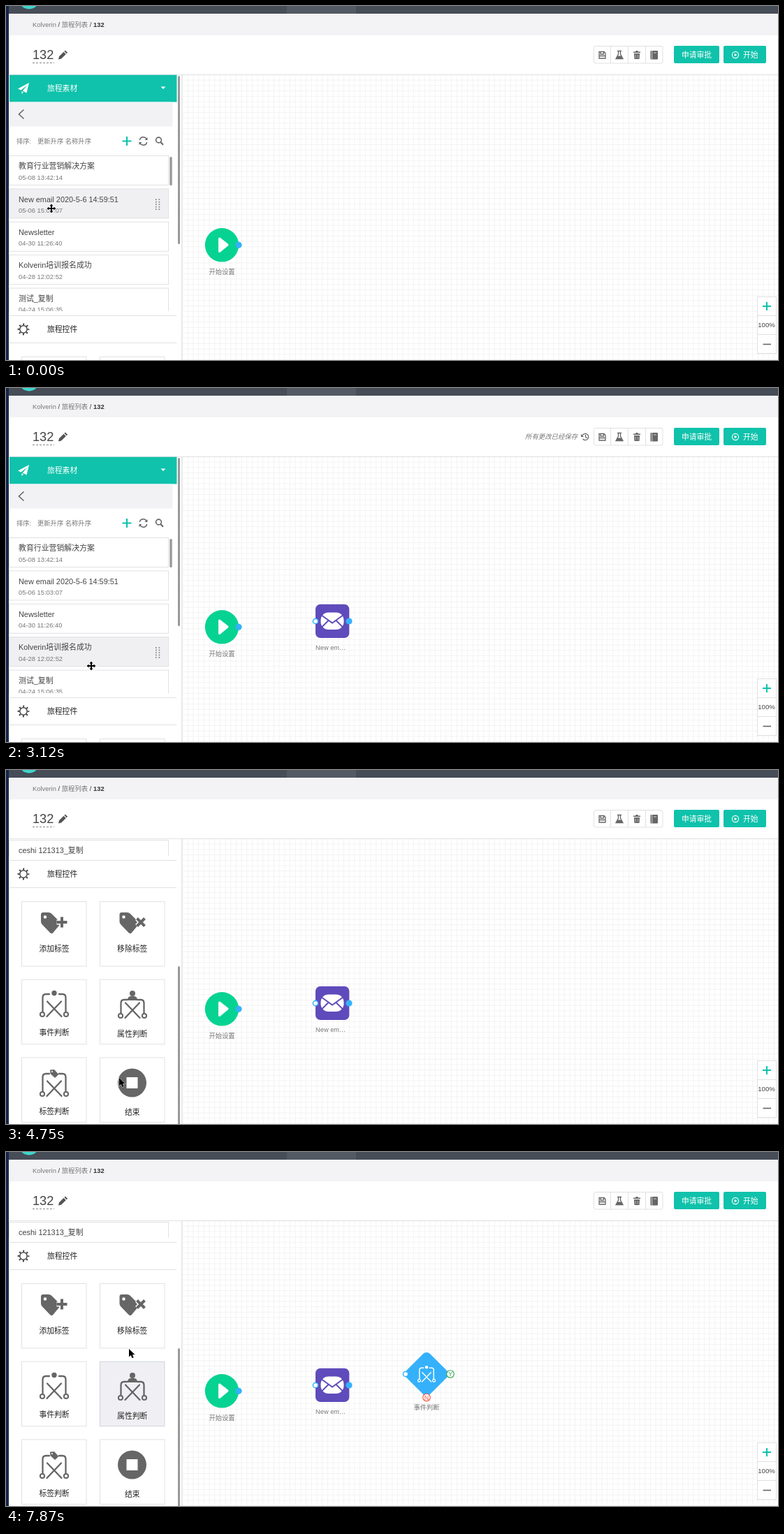
An HTML page that plays this animation: 1105 px wide and 507 px high, repeating every 8 s.

```html
<!DOCTYPE html>
<html lang="zh-CN">
<head>
<meta charset="utf-8">
<title>Journey editor</title>
<style>
  html, body { margin: 0; width: 100%; height: 100%; overflow: hidden; background: #fff; }
  svg { display: block; width: 1105px; height: 507px; }
  text { font-family: "Liberation Sans", "Noto Sans CJK SC", "Noto Sans CJK", sans-serif; white-space: pre; }
</style>
</head>
<body>
<svg id="stage" viewBox="0 0 1105 507" xmlns="http://www.w3.org/2000/svg"></svg>
<script>
const LOOP = 8000, STEP = 148.6, PITCH = 47.4;
const TEAL = '#10c2ab', BLUE = '#35b1fb', INK = '#444', GREY = '#666', LINE = '#e1e1e4', HOVER = '#f0f0f2';

const rect = (x, y, w, h, fill, more = '') =>
  `<rect x="${x}" y="${y}" width="${w}" height="${h}" fill="${fill}" ${more}/>`;
const circle = (x, y, r, fill, more = '') => `<circle cx="${x}" cy="${y}" r="${r}" fill="${fill}" ${more}/>`;
const stroke = (d, color, width = 1, more = '') =>
  `<path d="${d}" fill="none" stroke="${color}" stroke-width="${width}" ${more}/>`;
const shape = (d, fill, more = '') => `<path d="${d}" fill="${fill}" ${more}/>`;
const text = (x, y, s, size, fill, more = '') =>
  `<text x="${x}" y="${y}" font-size="${size}" fill="${fill}" ${more}>${s}</text>`;
const mid = (x, y, s, size, fill) => text(x, y, s, size, fill, 'text-anchor="middle"');
const at = (x, y, inner, more = '') => `<g transform="translate(${x} ${y})" ${more}>${inner}</g>`;

// Branch icon, centred on 0,0; y is the height of its shoulders
const arm = (side, y) =>
  `M${side * 7} ${y}H${side * 12}Q${side * 16.5} ${y} ${side * 16.5} ${y + 5}V10.500M${side * 10} -4.500L${side * -10.5} 17`;
const branch = (color, top, y = -15) =>
  stroke(arm(-1, y) + arm(1, y), color, 2.3, 'stroke-linecap="round"') +
  [-17, 17].map(x => circle(x, 14, 3.1, 'none', `stroke="${color}" stroke-width="2"`)).join('') + top;
const eventIcon = color => branch(color, circle(0, -16.5, 3.7, color));

const items = [
  ['教育行业营销解决方案', '05-08 13:42:14'],
  ['New email 2020-5-6 14:59:51', '05-06 15:03:07'],
  ['Newsletter', '04-30 11:26:40'],
  ['Kolverin培训报名成功', '04-28 12:02:52'],
  ['测试_复制', '04-24 15:06:35'],
  ['会议邀请_第二轮', '04-22 10:18:26'],
  ['报名成功通知', '04-17 17:40:12'],
  ['活动提醒邮件', '04-14 09:55:03'],
  ['直播回放 | 内容营销实战', '04-09 16:21:38'],
  ['客户关怀_访问触发', '04-07 14:08:51'],
  ['问卷调查邀请', '04-02 11:33:20'],
  ['直播占座 | 开源+截流，让每一分营销预…', '03-30 15:32:22'],
  ['破碎筛分_访问触发', '03-27 10:52:28'],
  ['【干货】不用996，也能当劳模！', '03-26 14:31:31'],
  ['自动化营销如何赋能品牌建设带动营销新…', '03-23 15:16:59'],
  ['报名倒计时 | 开源+截流，让每一分营销…', '03-20 16:49:47'],
  ['ceshi 121313_复制', '03-18 13:20:45']
];

function dots(x) {
  let s = '';
  for (let i = 0; i < 10; i++) s += rect(x + i % 2 * 4.6, 14 + (i >> 1) * 3.5, 1.6, 1.6, '#777');
  return s;
}
function card([title, date], i) {
  const wide = title.endsWith('…');
  return at(0, 215 + i * PITCH,
    rect(4.5, -.5, 228, 42, '#fff', `class="bg" stroke="${LINE}"`) +
    text(18, 18.3, title, 10.9, INK) + text(18, 33.5, date, 9.4, '#777') +
    `<g class="dots" clip-path="url(#cardClip)">${dots(wide ? 230 : 214)}</g>`, 'class="item"');
}

const tag = 'M50 207Q50 204 53 204H61Q63.500 204 65 205.500L77 217.500Q78.500 219.500 77 221.500L67 233.500Q65 235 63 233L51.500 221Q50 219.500 50 217Z';
const tagIcon = mark => shape(tag, GREY) + circle(56, 210.5, 2.2, '#fff') +
  stroke(mark, '#fff', 7) + stroke(mark, GREY, 4);
const person = circle(0, -18, 4, GREY) + shape('M-7 -8Q-7 -14 -2.500 -14H2.500Q7 -14 7 -8Z', GREY);
const miniTag = shape('M-6 -20.500L0 -21L6.500 -14L1 -9L-5.500 -15Z', GREY) + circle(-3, -18, 1.1, '#fff');
const tool = (col, row, label, base, icon) =>
  rect(22.5 + col * 112, 188.5 + row * 111.7, 92.5, 92.5, '#fff', `class="tool" stroke="${LINE}"`) +
  icon + mid(69 + col * 111.7, base, label, 10.8, '#222');

const toolbox = at(0, 314,
  stroke('M5 129.500H244M5 168.500H244', LINE) +
  circle(25, 149, 5.2, 'none', 'stroke="#444" stroke-width="1.5"') +
  circle(25, 149, 7.1, 'none', 'stroke="#444" stroke-width="2.6" stroke-dasharray="2 3.576" stroke-dashoffset="1"') +
  text(59, 153, '旅程控件', 10.8, '#222') +
  tool(0, 0, '添加标签', 260, tagIcon('M80 210.500V225.500M72.500 218H87.500')) +
  tool(1, 0, '移除标签', 260, at(112.5, 0, tagIcon('M75 212.500L86 223.500M86 212.500L75 223.500'))) +
  tool(0, 1, '事件判断', 380, at(69, 336, eventIcon(GREY))) +
  tool(1, 1, '属性判断', 382, at(181, 338, branch(GREY, person, -9))) +
  tool(0, 2, '标签判断', 493, at(69, 450, branch(GREY, miniTag))) +
  tool(1, 2, '结束', 494, circle(180.5, 448, 20.5, GREY) + rect(172.5, 440, 16, 16, '#fff')));

const sidebar =
  rect(5, 98, 239.500, 39.500, TEAL) +
  shape('M33 110L17 118.500L21.500 120.500L30.500 113.500L23.800 121.500L29.500 124.500ZM22.500 122V126L25 123.500Z', '#fff') +
  text(59, 122, '旅程素材', 10.8, '#fff') + shape('M221.500 115.500H228.500L225 119Z', '#fff') +
  rect(5, 137.5, 233.5, 35, '#f2f2f4') + stroke('M25.500 148.500L18.500 155L25.500 161.500', GREY, 1.6) +
  text(15, 196.500, '排序:', 9.3, '#777') + text(45, 196.500, '更新升序 名称升序', 9.3, '#777') +
  stroke('M173 187V200M166.500 193.500H179.500', TEAL, 2.2) +
  stroke('M191.300 192A5.200 5.200 0 0 1 201 190.500M201.700 195A5.200 5.200 0 0 1 192 196.500', GREY, 1.4) +
  shape('M202.500 188V192H198.500ZM190.500 199V195H194.500Z', GREY) +
  circle(218.5, 192, 3.9, 'none', `stroke="${GREY}" stroke-width="1.6"`) + stroke('M221.300 195L225 198.800', GREY, 2) +
  `<g clip-path="url(#listClip)"><g id="list">${items.map(card).join('')}</g></g>` +
  rect(234.3, 216, 3.4, 41, '#999', 'id="thumb" rx="1.5"') + toolbox;

const header =
  rect(0, 0, 1105, 11, '#464d57') + rect(402, 0, 99, 11, '#535a63') + circle(33, -10.5, 15, '#3fd6cc') +
  rect(0, 11, 1105, 31, '#f3f3f5') + rect(0, 42, 1105, 56, '#fff') +
  text(38, 29.500, `Kolverin <tspan fill="#333">/</tspan> 旅程列表 <tspan fill="#333">/ <tspan font-weight="bold">132</tspan></tspan>`, 9.4, '#777') +
  text(38, 76, '132', 18.2, INK) + stroke('M38 81.500H69', '#888', 1, 'stroke-dasharray="3 2"') +
  shape('M75 76.500L76 72.300L82.500 65.800L85.800 69L79.200 75.500ZM83.400 64.900L84.800 63.600L88.200 66.800L86.700 68.200Z', '#555') +
  `<g id="saved">${text(743, 73, '所有更改已经保存', 9.4, '#777', 'font-style="italic"')}` +
  stroke('M825 68A4.600 4.600 0 1 1 825.500 72.800M829.500 67V70.300L832 71.500', GREY, 1.2) + shape('M823 66V70H827Z', GREY) + '</g>' +
  rect(841.5, 57.5, 98.5, 24.5, '#fff', `stroke="${LINE}" rx="2"`) + stroke('M865.500 58V82M890.500 58V82M915.500 58V82', LINE) +
  stroke('M849 65.500H856L858 67.500V75H849ZM851 65.500V69H855.500V65.500M849 71.500H858', GREY, 1.3) +
  stroke('M875 64.500H881M876.500 65V69L873 75.500H883L879.500 69V65', GREY, 1.3) + shape('M875.500 71.500H880.500L882.500 75H873.500Z', GREY) +
  shape('M898 65.500H901L902 64H904L905 65.500H908V67H898ZM899 68H907L906.500 76H899.500Z', GREY) +
  stroke('M901.500 69.500V74.500M904.500 69.500V74.500', '#ccc', .8) +
  rect(922.5, 64, 10.500, 12.500, GREY, 'rx="1"') + stroke('M924.700 64V76.500M927 67H931', '#ddd', .9) +
  rect(956, 57, 65, 25, TEAL, 'rx="2"') + mid(988.5, 73.800, '申请审批', 10.8, '#fff') +
  rect(1027, 57, 61, 25, TEAL, 'rx="2"') + text(1055, 73.800, '开始', 10.8, '#fff') +
  circle(1044, 70, 4.6, 'none', 'stroke="#fff" stroke-width="1.1"') + shape('M1042.700 67.700L1046.500 70L1042.700 72.300Z', '#fff') +
  rect(5, 98, 1100, 1, '#dcdcdf', 'opacity=".8"');

const port = (x, y) => circle(x, y, 4.6, BLUE);
const inlet = (x, y) => circle(x, y, 3.6, '#fff', `stroke="${BLUE}" stroke-width="1.5"`);
const badge = (x, y, s, color) =>
  circle(x, y, 5.3, '#fff', `stroke="${color}" stroke-width="1.1"`) + mid(x, y + 3.2, s, 9, color);

const nodes =
  circle(309, 342.3, 24.2, '#06d391') +
  shape('M305.500 333L317 342L305.500 351.500Z', '#fff', 'stroke="#fff" stroke-width="3" stroke-linejoin="round"') +
  port(333, 342.3) + mid(309, 383.5, '开始设置', 9.3, '#777') +
  '<g id="mail">' + rect(443, 309.7, 48.3, 48.3, '#5f4bbb', 'rx="7"') +
  rect(450.5, 321.5, 33, 24.5, '#fff', 'rx="11"') +
  stroke('M451 325L467 336.500L483 325M451 343.500L461.500 333M483 343.500L472.500 333', '#5f4bbb', 1.9) +
  inlet(443, 334) + port(491, 334) + text(443, 375, 'New em…', 9.3, '#777') + '</g>' +
  '<g id="fork">' + rect(578, 294, 48, 48, BLUE, 'rx="7" transform="rotate(45 602 318)"') +
  at(602, 318.500, `<g transform="scale(.62)">${eventIcon('#fff')}</g>`) +
  inlet(572, 318) + badge(636, 318, 'Y', '#2fa84a') + badge(602, 351.5, 'N', '#f0523d') +
  mid(602, 369, '事件判断', 9.3, '#777') + '</g>';

const zoom =
  rect(1075.5, 416.5, 27, 81, '#fff', `stroke="${LINE}"`) + stroke('M1076 443.500H1102M1076 470.500H1102', LINE) +
  stroke('M1089 424V436M1083 430H1095', TEAL, 2) + stroke('M1083.500 484.500H1095', GREY, 1.6) +
  mid(1088.5, 460, '100%', 9.6, INK);

const ghostCard = rect(.5, .5, 228, 41, HOVER, `stroke="${LINE}"`) +
  text(13, 18.5, items[1][0], 10.9, INK) + text(13, 33.5, items[1][1], 9.4, '#777');
const ghostTool = circle(0, 0, 38, 'url(#halo)') + eventIcon(GREY);

const arrow = shape('M0 0V11.500L2.700 9L4.600 13.200L6.700 12.300L4.900 8.200H8.500Z', '#000',
  'stroke="#fff" stroke-width="1" paint-order="stroke"');
const moveD = 'M0 -6.500L2.600 -3.500H1V-1H3.500V-2.600L6.500 0L3.500 2.600V1H1V3.500H2.600L0 6.500L-2.600 3.500H-1V1H-3.500V2.600L-6.500 0L-3.500 -2.600V-1H-1V-3.500H-2.600Z';
const move = shape(moveD, '#000', 'stroke="#fff" stroke-width="1.6" paint-order="stroke"');

const stage = document.getElementById('stage');
stage.innerHTML = `<defs>
  <clipPath id="listClip"><rect x="4" y="214" width="235" height="223"/></clipPath>
  <clipPath id="cardClip"><rect x="0" y="0" width="232" height="42"/></clipPath>
  <clipPath id="sideClip"><rect x="4" y="98" width="248" height="409"/></clipPath>
  <radialGradient id="halo"><stop offset=".4" stop-color="#ececf1"/><stop offset="1" stop-color="#ececf1" stop-opacity="0"/></radialGradient>
  <pattern id="grid" x="252" y="98" width="7.7" height="7.7" patternUnits="userSpaceOnUse">
    ${stroke('M.500 0V7.700M0 .500H7.700', '#f3f3f4', 1)}</pattern></defs>` +
  rect(0, 0, 1105, 507, '#fff') + rect(252, 98, 853, 409, 'url(#grid)') +
  nodes + zoom + rect(251, 98, 1.5, 409, '#e6e6e8') +
  `<g clip-path="url(#sideClip)"><g id="side">${sidebar}</g>` +
  rect(246, 100, 3, 241, '#999', 'id="bar" rx="1.5"') + '</g>' + header +
  rect(0, 0, 4, 507, '#15264b') +
  `<g id="ghostCard" opacity=".5">${ghostCard}</g><g id="ghostTool" opacity=".6">${ghostTool}</g>` +
  `<g id="cursor"><g id="arrow">${arrow}</g><g id="move">${move}</g></g>`;

const el = {};
stage.querySelectorAll('[id]').forEach(n => el[n.id] = n);
const itemEls = [...stage.querySelectorAll('.item')].map(n => ({
  bg: n.querySelector('.bg'), dots: n.querySelector('.dots')
}));
const toolEls = [...stage.querySelectorAll('.tool')];
const show = (node, on) => node.setAttribute('display', on ? 'inline' : 'none');
const place = (node, x, y) => node.setAttribute('transform', `translate(${x} ${y})`);

// Keys are [step, value, ...]
const pointer = [
  [0, 65, 290], [1, 65, 290], [2, 110, 308], [4, 300, 360], [5, 390, 371], [6, 440, 371], [7, 466, 363],
  [8, 465, 352], [15, 465, 352], [16, 440, 355], [18, 290, 375], [20, 145, 396], [21, 122, 398], [23, 122, 398],
  [29, 157, 433], [30, 159, 435], [31, 162, 441], [32, 162, 441], [35, 100, 370], [37, 70, 343], [38, 70, 343],
  [39, 72, 342], [40, 72, 342], [41, 100, 342], [43, 380, 340], [44, 530, 337], [45, 597, 335], [47, 597, 335],
  [49, 480, 334], [51, 260, 322], [52, 195, 310], [53, 176, 282]
];
const listScroll = [[0, 0], [21, 0], [23, 60], [27, 455], [29, 529.4], [30, 558.4]];
const sideScroll = [[0, 0], [30, 0], [31, 190], [32, 314]];

function sample(keys, n) {
  const i = keys.findIndex(k => k[0] >= n);
  if (i < 0) return keys[keys.length - 1].slice(1);
  if (i === 0) return keys[0].slice(1);
  const a = keys[i - 1], b = keys[i], p = (n - a[0]) / (b[0] - a[0]);
  return a.slice(1).map((v, j) => v + (b[j + 1] - v) * p);
}

function draw(t) {
  const n = Math.floor((t + 9) / STEP);
  const [x, y] = sample(pointer, n), [scroll] = sample(listScroll, n), [side] = sample(sideScroll, n);
  const inList = n >= 16 && n <= 30 && x < 233;

  place(el.list, 0, -scroll);
  place(el.side, 0, -side);
  el.thumb.setAttribute('y', 216 + scroll * .161);
  el.thumb.setAttribute('height', n < 26 ? 41 : 35);
  el.bar.setAttribute('y', 100 + side * 181 / 314);

  itemEls.forEach((item, i) => {
    const top = 215 + i * PITCH - scroll;
    const on = n < 18 ? i === 1 : inList && y >= top && y < top + 42;
    item.bg.setAttribute('fill', on ? HOVER : '#fff');
    show(item.dots, on);
  });
  const hot = n >= 35 && n < 47 ? 2 : n >= 52 ? 3 : -1;
  toolEls.forEach((node, i) => {
    node.setAttribute('fill', i === hot ? '#f0f0f4' : '#fff');
    node.setAttribute('stroke', i === hot ? '#cfd3de' : LINE);
  });

  show(el.saved, n >= 13 && n < 26);
  show(el.mail, n >= 11);
  show(el.fork, n >= 47);
  show(el.ghostCard, n >= 2 && n <= 7);
  place(el.ghostCard, x - 60, y - 28);
  show(el.ghostTool, n >= 41 && n < 47);
  place(el.ghostTool, x - 3, y - 4);

  const moving = n === 0 || n >= 11 && n <= 15 || inList;
  show(el.move, moving);
  show(el.arrow, !moving);
  place(el.cursor, x, y);
}

let start;
function tick(now) {
  start ??= now;
  draw((now - start) % LOOP);
  requestAnimationFrame(tick);
}
draw(0);
requestAnimationFrame(tick);
</script>
</body>
</html>
```
